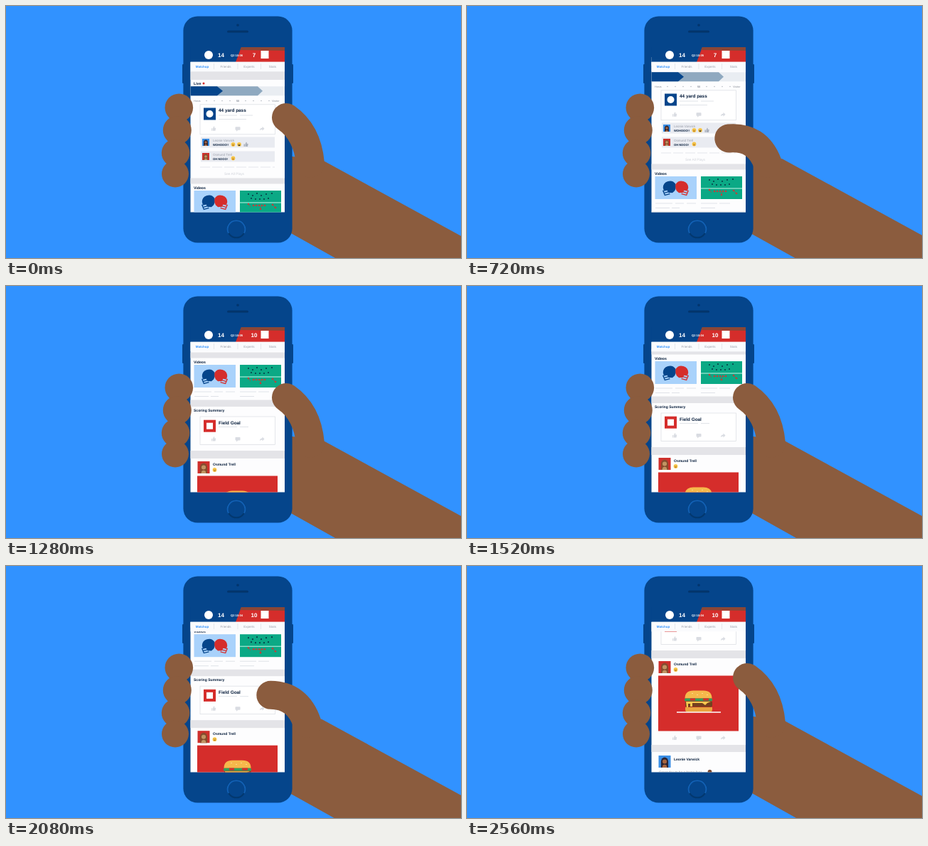
Write an HTML page that moves like this. It is 640x355 px and loops after 2.64 s.

```html
<!DOCTYPE html>
<html lang="en">
<head>
<meta charset="utf-8">
<title>Match day feed</title>
<style>
  html, body { margin: 0; height: 100%; overflow: hidden; background: #3192ff; }
  svg { display: block; width: 100vw; height: 100vh; }
  text { font-family: "Liberation Sans", Arial, sans-serif; text-rendering: geometricPrecision; }
  .b { font-weight: bold; }
</style>
</head>
<body>
<svg viewBox="0 0 640 355">
  <defs><clipPath id="screen"><rect x="259.500" y="58" width="132.500" height="232.500"/></clipPath></defs>
  <rect width="640" height="355" fill="#3192ff"/>
  <path id="arm" fill="#8b5c3e"/>
  <g fill="#05458b">
    <rect x="248" y="82" width="4" height="27" rx="1"/>
    <rect x="400" y="82" width="4" height="27" rx="1"/>
    <rect x="249.400" y="14.600" width="153.200" height="319" rx="20"/>
  </g>
  <g fill="#03346b">
    <circle cx="326" cy="27" r="1.800"/>
    <rect x="311" y="34.500" width="30" height="3" rx="1.500"/>
  </g>
  <g fill="none" stroke-width="2">
    <circle cx="324" cy="314" r="12.300" stroke="#03386f"/>
    <path d="M313 320A12.300 12.300 0 1 1 335 320" stroke="#1260b4"/>
  </g>
  <g clip-path="url(#screen)">
    <rect x="259" y="79" width="133" height="212" fill="#fdfdfe"/>
    <g id="feed"></g>
    <g id="header"></g>
  </g>
  <g fill="#8b5c3e">
    <circle cx="243.300" cy="143.200" r="19.800"/><circle cx="240.800" cy="175" r="20"/>
    <circle cx="238.600" cy="207" r="19.800"/><circle cx="238" cy="236.500" r="19"/>
  </g>
  <path id="thumb" fill="none" stroke="#8b5c3e" stroke-width="40" stroke-linecap="round"/>
</svg>
<script>
const $ = id => document.getElementById(id);
const NAVY = '#05458b', RED = '#d52d2b', GREY = '#e4e4e8', PALE = '#d9dce2', SKY = '#a9d2fb';

const rect = (x, y, w, h, fill, extra = '') =>
  `<rect x="${x}" y="${y}" width="${w}" height="${h}" fill="${fill}" ${extra}/>`;
const dot = (x, y, r, fill) => `<circle cx="${x}" cy="${y}" r="${r}" fill="${fill}"/>`;
const path = (d, fill, extra = '') => `<path d="${d}" fill="${fill}" ${extra}/>`;
const line = (d, color, w = 1) => path(d, 'none', `stroke="${color}" stroke-width="${w}"`);
const text = (x, y, size, str, fill = '#071d3b', cls = 'b', extra = '') =>
  `<text x="${x}" y="${y}" font-size="${size}" fill="${fill}" class="${cls}" ${extra}>${str}</text>`;
const centered = (x, y, size, str, fill, cls, id = '') =>
  text(x, y, size, str, fill, cls, `text-anchor="middle" ${id}`);
const gap = (y, h) => rect(259, y, 133, h, GREY);
const each = (list, fn) => list.map(fn).join('');

const smile = (x, y, mouth = '#b97a25') => dot(x, y, 2.9, '#fbc94a') +
  dot(x - 1, y - .7, .4, '#60401a') + dot(x + 1, y - .7, .4, '#60401a') +
  path(`M${x - 1.6} ${y + .5}h3.200a1.600 1.600 0 0 1-3.200 0z`, mouth);

const like = (x, y, color) => path(
  `M${x - 3} ${y - .5}h1.400v3.500h-1.400zM${x - 1} ${y - .5}l1.400-3q1.400 0 .8 2.500h2l-.7 4h-3.500z`, color);

const actions = y => like(292, y, PALE) +
  rect(322.500, y - 2.5, 7, 4.5, PALE, 'rx=".8"') + path(`M324 ${y + 1}v3l2.500-2z`, PALE) +
  path(`M357 ${y + 2.5}q0-3.500 3.500-3.500v-2l3 3-3 3v-2q-2 0-3.500 1.500z`, PALE);

const avatar = (x, y, s, back, skin, hair) => rect(x, y, s, s, back) +
  `<g transform="translate(${x} ${y}) scale(${s / 10})">` +
  path('M2 10V5a3 3.500 0 0 1 6 0v5z', hair) + dot(5, 5, 1.8, skin) +
  path('M3 10q0-2.500 2-2.500t2 2.500z', skin) + '</g>';
const leonie = (x, y, s) => avatar(x, y, s, '#3b8fe6', '#a5643f', '#2c2433');
const osmund = (x, y, s) => avatar(x, y, s, '#cf302c', '#c19463', '#874c2e');

const card = (y, h, tile, title, lines) =>
  rect(273, y, 105.500, h, '#fff', `stroke="${PALE}" stroke-width=".7"`) +
  rect(278, y + 4.7, 17, 17, tile) +
  (tile === RED ? rect(282, y + 8.7, 9, 9, '#fff') : dot(286.500, y + 13.2, 5, '#fff')) +
  text(299, y + 10.5, 6.4, title) + line(lines, PALE, .8) + actions(y + h - 8);

const comment = (y, face, name, words) =>
  rect(274, y, 104, 15, '#e9ebf1') + face(276, y + 2.5, 10) +
  text(291, y + 6, 4.5, name, '#9b9faa', '') + text(291, y + 12.4, 4.05, words);

// Shell and face guard pointing left; mirrored for the other side.
const helmet = color => '<g transform="rotate(-14) scale(.92)">' +
  path('M0 9Q-10 8-9-1A10.500 10.500 0 0 1 11-2Q11 4 7 8L3 10Z', color) +
  path('M-9 3l5 1 2 6-6 0z', SKY) +
  line('M-4 3.500h-6l1 7h8M-9 7h7', color, 1.4) + '</g>';

const formation = () => {
  const players = [[341, 265], [347, 267], [353, 264], [359, 267], [366, 265], [374, 264],
    [345, 271], [351, 272], [357, 272], [363, 272], [369, 271]];
  const rivals = [[341, 279], [348, 281], [352, 281], [356, 281], [360, 281], [364, 281],
    [375, 280], [358, 286], [379, 284]];
  return rect(329, 260, 58, 32, '#0ba985') + line('M329 277h58', '#d9fff2', .9) +
    each(players, ([x, y]) => dot(x, y, 1.1, '#073d48')) +
    each(rivals, ([x, y]) => dot(x, y, 1.3, '#c53c38')) +
    line('M341 279l3 4M375 280l4 4M358 282v4', '#c53c38', .7);
};

const burger = () => rect(269, 416.5, 113, 78, RED) +
  path('M306.500 448.500q0-11 12-11h14q12 0 12 11z', '#f6b84b') +
  each([316, 323, 330, 337], (x, i) => rect(x, 441 + i % 2 * 2, 2, .8, '#ffe09a')) +
  rect(306, 448.5, 39, 4, '#33a05a', 'rx="1.500"') + rect(314, 448.5, 7, 3, RED) + rect(332, 448.5, 8, 3, RED) +
  rect(307, 452.5, 38, 8, '#75401f', 'rx="2"') +
  path('M308 453h35l-5 2-3 3-4-3h-14v5h-3v-4h-3v6h-2z', '#f9c84f') +
  path('M307 461h38v3q0 4-4 4h-30q-4 0-4-4z', '#e9a43f') +
  line('M295 468h62', '#fff', 1.6);

$('feed').innerHTML = [
  gap(92, 12), text(264, 110.5, 5.2, 'Live'), dot(278, 109, 1.5, RED),
  rect(259, 113.3, 133, 13, '#e9edf2'),
  path('M259 113.300h95l7 6.500-7 6.500h-95z', '#8fa9c0'),
  path('M259 113.300h38l8 6.500-8 6.500h-38z', NAVY),
  text(264, 135, 3.8, 'Hosts', '#8b909b', ''), text(374, 135, 3.8, 'Visitor', '#8b909b', ''),
  centered(326, 135, 3.8, '50', '#8b909b'),
  each([282, 293, 304, 315, 337, 348, 359, 370], x => dot(x, 133.5, .8, '#b4b9c3')),
  card(138.8, 42, NAVY, '44 yard pass', 'M299 154h26m4 0h18M299 159.500h39'),
  comment(184.5, leonie, 'Leonie Varwick', 'WOHOOO!!'),
  smile(319.5, 195), smile(328, 195, '#26222a'), like(337.5, 195, '#aab1bd'),
  comment(204.5, osmund, 'Osmund Trell', 'OH NOOO!'), smile(319.5, 214.5),
  path('M273 227h105', 'none', `stroke="${PALE}" stroke-width=".7" stroke-dasharray="14 3"`),
  centered(321, 238, 4.8, 'See All Plays', '#d0d3da', ''),
  gap(242.5, 8), text(264, 258, 5.2, 'Videos'),
  rect(264.5, 260, 58.5, 32, SKY),
  `<g transform="translate(284 275)">${helmet(NAVY)}</g>`,
  `<g transform="translate(303 275) scale(-1 1)">${helmet(RED)}</g>`,
  formation(),
  line('M265 298h24m4 0h12m4 0h13M265 304.500h20m3 0h11M329 298h23m3 0h15M329 304.500h20', PALE, .8),
  gap(309.5, 9.5), text(264, 326.3, 5.05, 'Scoring Summary'),
  card(333, 39.5, RED, 'Field Goal', 'M299 347.500h26m4 0h12'),
  gap(381, 11), osmund(269.5, 396, 17), text(291, 402, 5, 'Osmund Trell'), smile(293.5, 408),
  burger(), actions(504),
  gap(514, 10), leonie(269.5, 529, 17), text(291, 535.8, 5, 'Leonie Varwick'),
  text(270, 553.5, 4.8, 'Great day to be a home fan!', '#8b909b', ''), dot(341.5, 552, 2.9, '#75452f')
].join('');

$('header').innerHTML = [
  rect(259, 58, 133, 21, NAVY), path('M331 58h61v21h-69z', RED), path('M331 58h61v5l-63-1z', '#8b4636'),
  dot(285, 69, 6, '#fff'), rect(358.5, 63, 11, 11, '#fff'),
  centered(302.5, 72, 8, '14', '#fff', 'b'),
  centered(324.5, 70.7, 4.1, '', '#fff', 'b', 'id="clock"'),
  centered(349, 72, 8, '', '#fff', 'b', 'id="score"'),
  rect(259, 78.6, 133, 13.7, '#fafbfd'),
  each(['Matchup', 'Friends', 'Experts', 'Stats'], (name, i) =>
    centered(276 + i * 33, 87, 4.5, name, i ? '#9b9faa' : '#3192ff', i ? '' : 'b')),
  line('M292.500 81v8M326 81v8M358.500 81v8', PALE, .6)
].join('');

const LOOP = 2640, STEP = 80;
const SCROLL = [[0, 0], [320, 2], [640, 7], [720, 20], [800, 70], [880, 112], [960, 133], [1040, 142],
  [1280, 149], [1760, 159], [2160, 165], [2240, 172], [2320, 194], [2400, 228], [2480, 251], [2560, 262]];
const REACH = [[0, 0], [400, 0], [480, .25], [560, .7], [640, 1], [720, .83], [800, .45], [880, .12], [960, 0],
  [1920, 0], [2000, .25], [2080, .7], [2160, 1], [2240, .83], [2320, .47], [2400, .14], [2480, 0], [2560, 0]];

function at(keys, t) {
  const i = keys.findIndex(key => key[0] >= t);
  if (i < 1) return keys[0][1];
  const [t0, a] = keys[i - 1], [t1, b] = keys[i];
  return a + (b - a) * (t - t0) / (t1 - t0);
}

function draw(now) {
  const t = Math.floor(now % LOOP / STEP) * STEP;
  const p = at(REACH, t);
  $('feed').setAttribute('transform', `translate(0 ${-at(SCROLL, t)})`);
  $('clock').textContent = 'Q2 10:0' + (t < 240 ? 6 : t < 1440 ? 5 : 4);
  $('score').textContent = t < 960 ? 7 : 10;
  $('thumb').setAttribute('d',
    `M${394 - 31 * p} ${157 + 35.5 * p}Q${424 - 19 * p} ${178 + 6 * p} ${428 - 6 * p} 222`);
  $('arm').setAttribute('d',
    `M403 212L${447.5 - 5 * p} ${218.5 - 4 * p}L640 ${324 - 1.3 * p}V355H${463 - 2 * p}L390 ${314 + 1.5 * p}V212Z`);
  requestAnimationFrame(draw);
}
requestAnimationFrame(draw);
</script>
</body>
</html>
```
